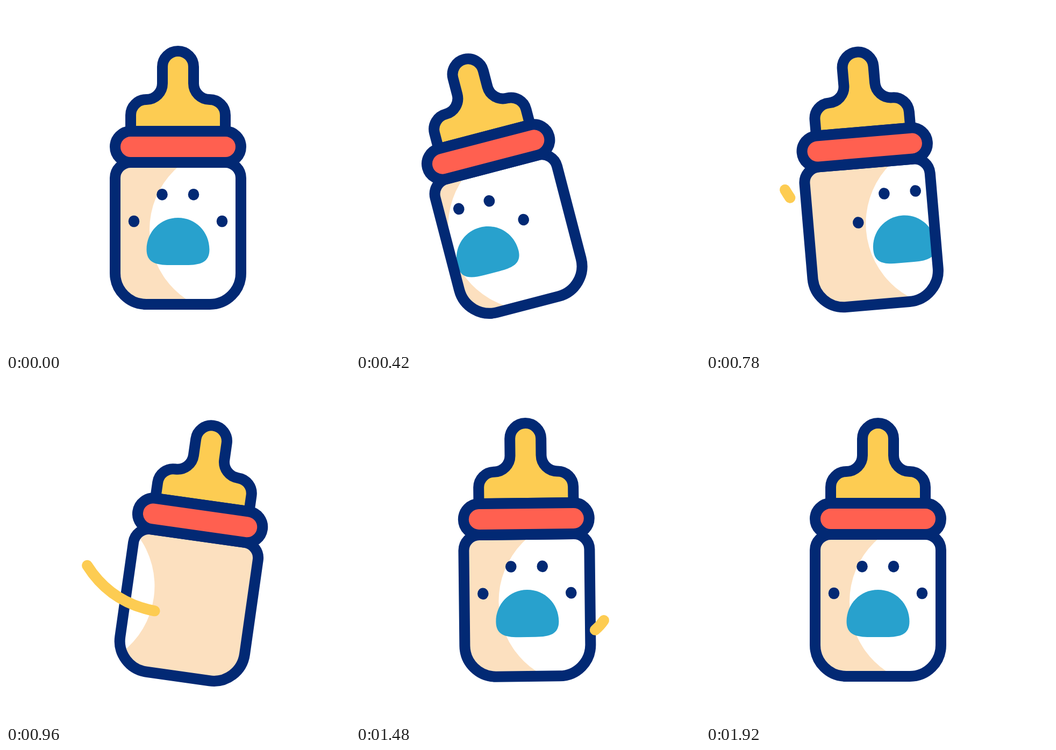
An HTML page that plays this animation: 640x640 px, repeating every 2400 ms.

```html
<!DOCTYPE html>
<html lang="en">
<head>
<meta charset="utf-8">
<title>Baby bottle</title>
<style>
  html, body { margin: 0; width: 100%; height: 100%; overflow: hidden; background: #fff; }
  svg { display: block; width: 100vw; height: 100vh; }
  .line { stroke: #022974; stroke-width: 20; stroke-linejoin: round; }
  .swoosh { fill: none; stroke: #fdcc52; stroke-width: 20; stroke-linecap: round; }
</style>
</head>
<body>
<svg viewBox="0 0 640 640">
  <defs>
    <path id="body" d="M232 291H408A29 29 0 0 1 437 320V497A58 58 0 0 1 379 555H261A58 58 0 0 1 203 497V320A29 29 0 0 1 232 291Z"/>
    <clipPath id="inside"><use href="#body"/></clipPath>
  </defs>
  <g id="bottle">
    <g clip-path="url(#inside)">
      <rect x="193" y="281" width="254" height="284" fill="#fce0bf"/>
      <circle id="light" cx="423" cy="416.5" r="156" fill="#fff"/>
      <g id="face" fill="#022974">
        <path fill="#28a1cd" d="M320 394C352.500 394 378.500 420 378.500 453C378.500 477 362 482 335 482H305C278 482 261.500 477 261.500 453C261.500 420 287.500 394 320 394Z"/>
        <ellipse cx="290.500" cy="350.700" rx="10.300" ry="10.800"/>
        <ellipse cx="349" cy="350.700" rx="10.300" ry="10.800"/>
        <ellipse cx="238" cy="400.500" rx="10.300" ry="10.800"/>
        <ellipse cx="402" cy="400.500" rx="10.300" ry="10.800"/>
      </g>
    </g>
    <use href="#body" class="line" fill="none"/>
    <path class="line" fill="#fdcc52" d="M232 233V203A29 29 0 0 1 261 174A30 30 0 0 0 291 144V113A29 29 0 0 1 349 113V144A30 30 0 0 0 379 174A29 29 0 0 1 408 203V233Z"/>
    <rect class="line" fill="#ff6050" x="203" y="233" width="234" height="58" rx="29"/>
  </g>
  <path id="upper" class="swoosh" pathLength="1" d="M147 342C182 402 240 438 328 438C400 438 455 422 495 383"/>
  <path id="lower" class="swoosh" pathLength="1" d="M325 492C380 497 434 491 461 451"/>
</svg>
<script>
  const LOOP = 2400;
  const $ = id => document.getElementById(id);

  // Tables of [time, value], eased in and out between entries
  const tilt = [[0, 0], [583, -18], [978, 8.2], [1328, -4.15], [1610, 2.1], [1920, 0]];
  const spin = (back, turn) => [[0, 0], [583, back], [1328, turn]];

  const parts = [
    { el: $('face'), keys: spin(-62, 628), turn: 628, wrapAt: 300 },
    { el: $('light'), keys: spin(-73, 590), turn: 590, wrapAt: 200 }
  ];
  const swooshes = [
    { el: $('upper'), head: [[709, 0], [1279, 1]], tail: [[914, 0], [1474, 1]] },
    { el: $('lower'), head: [[1002, 0], [1402, 1]], tail: [[1184, 0], [1582, 1]] }
  ];

  function at(keys, t) {
    if (t <= keys[0][0]) return keys[0][1];
    for (let i = 1; i < keys.length; i++) {
      const [t0, a] = keys[i - 1], [t1, b] = keys[i];
      if (t < t1) {
        const p = (t - t0) / (t1 - t0);
        return a + (b - a) * p * p * (3 - 2 * p);
      }
    }
    return keys[keys.length - 1][1];
  }

  function draw(t) {
    $('bottle').setAttribute('transform', `rotate(${at(tilt, t)} 320 555)`);

    // The print leaves on the right and comes round again from the left
    for (const { el, keys, turn, wrapAt } of parts) {
      let x = at(keys, t);
      if (x > wrapAt) x -= turn;
      el.setAttribute('transform', `translate(${x} 0)`);
    }

    for (const { el, head, tail } of swooshes) {
      const from = at(tail, t), size = at(head, t) - from;
      el.style.display = size > 0.002 ? '' : 'none';
      el.style.strokeDasharray = `${size} 2`;
      el.style.strokeDashoffset = -from;
    }
  }

  const start = performance.now();
  function tick() {
    draw((performance.now() - start) % LOOP);
    requestAnimationFrame(tick);
  }
  tick();
</script>
</body>
</html>
```
